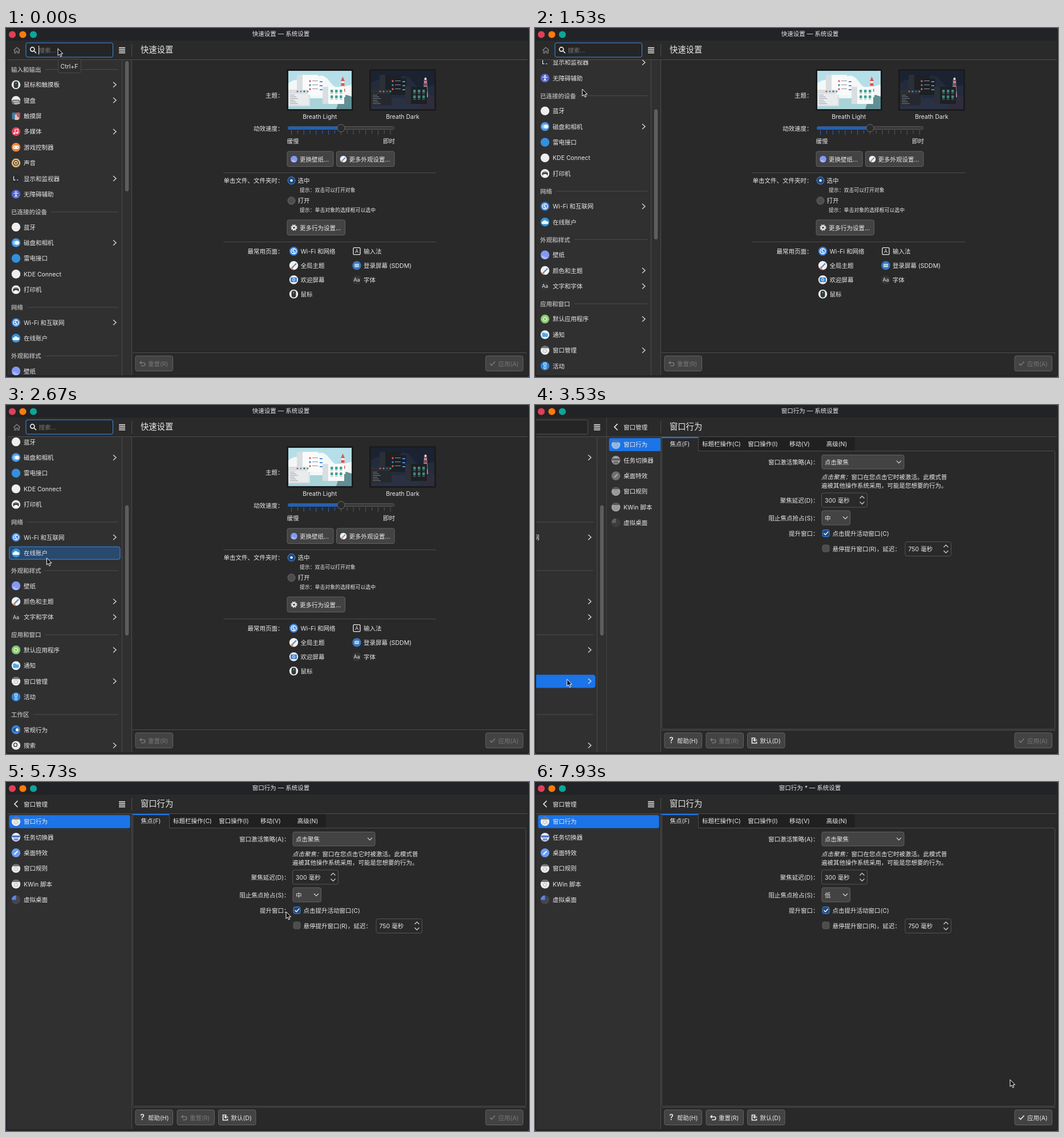
An HTML page for the animation above (8000 ms loop, 917x611 px).

```html
<!DOCTYPE html>
<html lang="zh-CN">
<head>
<meta charset="utf-8">
<title>系统设置</title>
<style>
html, body { margin: 0; width: 100%; height: 100%; overflow: hidden; background: #232427; }
svg { display: block; width: 100%; height: 100%; }
text { font: 10.5px Inter, 'Noto Sans CJK SC', 'Noto Sans CJK', sans-serif; fill: #e9e9e9; white-space: pre; }
.head { font-size: 14.3px; }
.section { font-weight: 700; fill: #a6a6a6; }
.hint { font-size: 8.9px; }
.mid { text-anchor: middle; }
.end { text-anchor: end; }
.off text { fill: #777; }
.line { stroke: #4d4d4e; fill: none; }
.ink { stroke: #ececec; fill: none; stroke-width: 1.7; }
.off .ink { stroke: #777; }
.thin { stroke: #dcdcdc; fill: none; stroke-width: 1.1; }
.arrow { stroke: #d6d6d6; fill: none; stroke-width: 1.4; }
</style>
</head>
<body>
<svg id="stage" viewBox="0 0 917 611" preserveAspectRatio="none"></svg>
<script>
const $ = id => document.getElementById(id);
const rect = (x, y, w, h, fill, more = '') => `<rect x="${x}" y="${y}" width="${w}" height="${h}" fill="${fill}" ${more}/>`;
const disc = (x, y, r, fill, more = '') => `<circle cx="${x}" cy="${y}" r="${r}" fill="${fill}" ${more}/>`;
const path = (d, more = 'class="ink"') => `<path d="${d}" ${more}/>`;
const line = d => path(d, 'class="line"');
const label = (x, mid, s, cls = '', more = '') => `<text x="${x}" y="${mid + 4}" class="${cls}" ${more}>${s}</text>`;
const group = (id, body, more = '') => `<g id="${id}" ${more}>${body}</g>`;
const at = (x, y, body, scale = 1) => `<g transform="translate(${x} ${y}) scale(${scale})">${body}</g>`;
const box = (x, y, w, h, fill = '#434344', stroke = '#626263', more = '') =>
  rect(x + .5, y + .5, w - 1, h - 1, fill, `stroke="${stroke}" rx="3" ${more}`);

// Icons are drawn around their centre, about 16 px wide.
const base = fill => disc(0, 0, 7.7, fill);
const white = (d, w = 1.5) => path(d, `fill="none" stroke="#fff" stroke-width="${w}"`);
const icons = {
  mouse: base('#f1f1f1') + rect(-4, -6, 8, 12, '#35393a', 'rx="4"') + rect(-.6, -4, 1.2, 3, '#5fce9a'),
  keyboard: base('#ececec') + rect(-7, -1, 14, 8, '#77787b', 'rx="2"') + white('M-5 2H5M-3 5H7', 1),
  touch: rect(-7, -6, 14, 12, '#397ea3', 'rx="2"') + rect(1, -6, 6, 7, '#d54e66') + path('M-2 7V-2L1 -3L2 1L6 3L4 7Z', 'fill="#f0bd9c"'),
  music: base('#ed405b') + white('M-1.5 3V-3.5L3.5 -4.5V2', 1.2) + disc(-3, 3, 1.7, '#fff') + disc(2, 2, 1.7, '#fff'),
  game: base('#f2853b') + rect(-5, -3, 10, 6, '#fff', 'rx="2.6"') + disc(-2.5, 0, 1, '#f2853b') + disc(2.5, 0, 1, '#f2853b'),
  sound: base('#e3b673') + disc(0, 0, 5, '#4b4238') + disc(0, 0, 3.4, '#e9c68f') + disc(0, 0, 1.5, '#4b4238'),
  display: base('#2b2c32') + white('M-4 -4V2.5H-1', 1.1) + white('M1.5 2.5H4', 1.1),
  access: base('#5566c9') + disc(0, -4, 1.3, '#fff') + white('M-4 -1.5H4M0 -1.5V1M-2 5L0 1L2 5', 1.2),
  pale: base('#eeeeee'),
  blue: base('#3390df'),
  disk: base('#4a9cec') + rect(-5, -3.5, 10, 7, '#9ccbf6', 'rx="3.5"') + disc(2, 0, 3.5, '#fff'),
  printer: base('#ededed') + rect(-5, -2, 10, 5, '#3c3f40', 'rx="1"') + rect(-3, 1, 6, 4, '#fff') + rect(-3, -4, 6, 2, '#8e9091'),
  net: base('#3d83dc') + disc(0, 0, 4.6, 'none', 'stroke="#fff" stroke-width="1.3"') + white('M1 -4L-2 0L1 1L0 4', 1.4),
  cloud: base('#3396dc') + path('M-4 3.5a2.2 2.2 0 0 1 .5 -4.4a3.2 3.2 0 0 1 6 -.4a2.5 2.5 0 0 1 1.5 4.8Z', 'fill="#fff"'),
  wall: base('#8299f4') + path('M-7 3Q-3 0 0 3T7 3A7.7 7.7 0 0 1 -7 3Z', 'fill="#a5b8ff"'),
  theme: base('#f1f1f1') + path('M-3 4L4.500 -3.500', 'stroke="#5b86c9" stroke-width="2.2"') + path('M-6 4A7.7 7.7 0 0 0 0 7.7L-2.500 3Z', 'fill="#e9855b"'),
  font: base('#343537') + label(0, -.6, 'Aa', 'mid', 'style="font-size:9px"'),
  apps: base('#86c96f') + disc(0, 0, 3.2, 'none', 'stroke="#fff" stroke-width="1.8" stroke-dasharray="1.7 .8"'),
  notice: base('#eaf3fb') + rect(-5, -2, 10, 6, '#4fa8e8', 'rx="1"') + rect(-5, -3.5, 5, 3, '#4fa8e8'),
  window: base('#ededed') + path('M-6.7 -3.8A7.7 7.7 0 0 1 6.7 -3.8Z', 'fill="#6f7072"') +
    disc(0, 1.2, 3, 'none', 'stroke="#b9b9b9" stroke-width="1.4" stroke-dasharray="1.6 .8"'),
  activity: base('#2f87db') + rect(-2, -5, 4, 4, 'none', 'stroke="#fff"') + disc(0, 3, 2, 'none', 'stroke="#fff"'),
  behave: base('#3f84da') + rect(-5, -3, 10, 6, '#214f93', 'rx="3"') + disc(2, 0, 2.6, '#fff'),
  search: base('#ececec') + disc(-1, -1, 3, 'none', 'stroke="#444" stroke-width="1.4"'),
  input: rect(-6, -6, 12, 12, '#222', 'rx="1.5" stroke="#eee" stroke-width="1.3"') + label(0, -.4, 'A', 'mid', 'style="font-size:9px"'),
  login: base('#3977bd') + rect(-4, -3, 8, 6, '#b5d5f2', 'rx="1"') + path('M-3 0H3', 'stroke="#3977bd" stroke-dasharray="1.3 1"'),
  welcome: base('#eeeeee') + rect(-5.5, -4, 11, 8, '#3e84cf', 'rx="1"') + disc(0, 0, 2, 'none', 'stroke="#fff"'),
  tasks: base('#e9eefb') + rect(-7, -3, 14, 3.5, '#4a79d6') + rect(-4, 2, 8, 4, '#7d93c8'),
  effects: base('#6b9df2') + white('M-3 3L3 -3', 2),
  desks: base('#44464d') + path('M0 0V-7.7A7.7 7.7 0 0 0 -7.7 0Z', 'fill="#5a86e8"'),
  gear: disc(0, 0, 4, 'none', 'stroke="#e8e8e8" stroke-width="3.2"') + disc(0, 0, 6.4, 'none', 'stroke="#e8e8e8" stroke-width="2" stroke-dasharray="2.7 2.33"'),
  undo: path('M-1.5 -4L-4 -1.5L-1.5 1M-4 -1.5H2A2.6 2.6 0 0 1 2 4H-2'),
  check: path('M-4.5 0L-1.5 3L4.5 -3.5'),
  reset: path('M2 -4.5H-4V4.5H4V2M5 -1H-1M1.5 -3.5L-1 -1L1.5 1.5'),
  help: label(0, 0, '?', 'mid', 'style="font-size:14px;font-weight:600"'),
};
const icon = (name, x, y, scale) => at(x, y, icons[name], scale);
const chevron = (x, y) => path(`M${x - 2.5} ${y - 4.5}L${x + 2.5} ${y}L${x - 2.5} ${y + 4.5}`, 'class="arrow"');
const menu = path('M198 34.5H209M198 37.5H209M198 40.5H209M198 43.5H209', 'stroke="#efefef" stroke-width="1.4"');
const button = (x, y, w, name, s, { id = '', cls = '', scale = 1 } = {}) => group(id, box(x, y, w, 27.5) +
  icon(name, x + 12.5, y + 14, scale) + label(x + 22.5, y + 14, s), `class="${cls}"`);

// Main list; a trailing > marks entries with a sub page.
const sections = [
  ['输入和输出', 'mouse 鼠标和触摸板>', 'keyboard 键盘>', 'touch 触摸屏', 'music 多媒体>', 'game 游戏控制器', 'sound 声音', 'display 显示和监视器>', 'access 无障碍辅助'],
  ['已连接的设备', 'pale 蓝牙', 'disk 磁盘和相机>', 'blue 雷电接口', 'pale KDE Connect', 'printer 打印机'],
  ['网络', 'net Wi-Fi 和互联网>', 'cloud 在线账户'],
  ['外观和样式', 'wall 壁纸', 'theme 颜色和主题>', 'font 文字和字体>'],
  ['应用和窗口', 'apps 默认应用程序>', 'notice 通知', 'window 窗口管理>', 'activity 活动'],
  ['工作区', 'behave 常规行为', 'search 搜索>'],
];
const PITCH = 27.4;
const rows = [];
let listMarkup = '', y = 72.6, windowRow;
for (const [title, ...items] of sections) {
  listMarkup += label(9, y, title, 'section') + line(`M${16 + title.length * 10.5} ${y}H197`);
  y += 26.6;
  for (const item of items) {
    const [, name, text, more] = item.match(/^(\w+) ([^>]+)(>?)$/);
    listMarkup += icon(name, 17.5, y) + label(31, y, text) + (more ? chevron(190.5, y) : '');
    if (text === '窗口管理') windowRow = y;
    rows.push(y);
    y += PITCH;
  }
  y += 30.9 - PITCH;
}
const subItems = [['window', '窗口行为'], ['tasks', '任务切换器'], ['effects', '桌面特效'], ['window', '窗口规则'], ['window', 'KWin 脚本'], ['desks', '虚拟桌面']];
const subRows = subItems.map((_, i) => 69.2 + i * PITCH);
const rowBox = (id, w) => rect(6, 0, w, 22, '#29496d', `id="${id}" rx="3" stroke="#3b8be6"`);

const mainPage = rect(2, 22, 219, 33, '#2a2a2b') + rect(2, 56, 219, 552, '#303031') +
  path('M13.5 39L19 34L24.5 39M15 38.5V44H17.5V40.5H20.5V44H23V38.5', 'fill="none" stroke="#8c8c8c" stroke-width="1.2"') +
  box(34.5, 25.5, 153.5, 26, '#252526', '#3d8ee6', 'id="field"') + disc(46.3, 37.3, 3.6, 'none', 'stroke="#eee" stroke-width="1.7"') +
  path('M49 40L53 44') + label(57.5, 38.5, '搜索…', '', 'style="fill:#777"') +
  rect(57, 31, 1, 15.5, '#eee', 'id="caret"') + menu +
  `<g clip-path="url(#listClip)">${group('list', rowBox('hover', 194) + listMarkup)}</g>` +
  line('M203.5 56V608') + rect(209.5, 58.5, 5, 227, '#5c5c5d', 'id="thumb" rx="2.5" stroke="#777" stroke-width=".7"') +
  line('M220.5 22V608');
const subPage = rect(2, 22, 219, 33, '#2a2a2b') + rect(2, 56, 219, 552, '#303031') + path('M20.5 33L15 38.5L20.5 44') +
  label(31, 38.5, '窗口管理') + menu + rect(5.5, 58, 212, 22.8, '#1b74e8', 'rx="3"') + rowBox('subHover', 211) +
  group('subIcons', subItems.map(([n], i) => icon(n, 17.5, subRows[i])).join('')) +
  subItems.map(([, s], i) => label(31, subRows[i], s)).join('');

function preview(x, dark) {
  const [sky, cloud, sea, panel, side, red, wall, cliff, folder] = dark
    ? ['#1b2231', '#232c3d', '#2b3145', '#1d2024', '#2b3036', '#874655', '#a497a8', '#2f2d3d', '#3b8a7d']
    : ['#b5dfe8', '#f2f8f8', '#a8d3d9', '#fafafa', '#d9dee1', '#de5358', '#f7f2ef', '#5f8f94', '#3da593'];
  let s = rect(-3, -3, 117, 73, '#1b1b1c', 'rx="2"') + rect(0, 0, 111, 67, sky) +
    path('M0 22Q12 12 24 18T50 10Q62 4 72 18T90 30L111 24V50H0Z', `fill="${cloud}"`) + rect(0, 48, 111, 19, sea) +
    path('M84 67L90 48L102 42L111 45V67Z', `fill="${cliff}"`) +
    path('M91 46L93 18H98L100 46Z', `fill="${wall}"`) + path('M92.5 24H98.5M92 34H99.5', `stroke="${red}" stroke-width="5"`) +
    path('M92 18L95.500 10L99 18Z', `fill="${red}"`) + (dark ? disc(95.5, 14, 2, '#ffe5c9') : '') +
    rect(15, 7, 37, 28, panel) + rect(15, 7, 10, 28, side) + rect(0, 33, 38, 29, side) + rect(2, 40, 34, 20, panel, 'opacity=".45"') +
    rect(34, 13, 28, 29, panel) + rect(60, 28, 38, 30, panel) + rect(60, 28, 10, 30, side);
  for (let i = 0; i < 3; i++) s += disc(38, 18 + 7 * i, 1.7, ['#ed5a52', '#3584dd', '#e85a51'][i]) + rect(42, 17 + 7 * i, 10, 1, '#8b929b') + rect(55, 18 + 7 * i, 5, 2, '#4c8de3');
  for (let i = 0; i < 6; i++) s += rect(74 + i % 3 * 8, 33 + (i / 3 | 0) * 10, 4.5, 5, folder, 'rx="1"') + rect(74 + i % 3 * 8, 39.5 + (i / 3 | 0) * 10, 4.5, .8, '#8b929b');
  for (let i = 0; i < 4; i++) s += disc(16 + i * 6, 36, 1.6, ['#db4b55', '#4b89d8', '#58585c', '#38a489'][i]);
  for (let i = 0; i < 6; i++) s += rect(3, 42 + i * 3, 8 + i % 3 * 3, .8, '#8b929b');
  return at(x, 75, s);
}
const ticks = Array.from({ length: 17 }, (_, i) => {
  const x = 500.5 + i * 10.85;
  return path(`M${x} 179V${i % 2 ? 185 : 187}`, `stroke="${i < 8 ? '#2868b8' : '#5a5a5a'}"`);
}).join('');
const frequent = [['net', 'Wi-Fi 和网络'], ['theme', '全局主题'], ['welcome', '欢迎屏幕'], ['mouse', '鼠标'], ['input', '输入法'], ['login', '登录屏幕 (SDDM)'], ['font', '字体']];
const small = { scale: .76 };
const quickPage = label(236, 39.2, '快速设置', 'head') + label(486.5, 117.5, '主题：', 'end') + preview(495, false) + preview(640, true) +
  label(550.2, 155, 'Breath Light', 'mid') + label(695.5, 155, 'Breath Dark', 'mid') +
  label(486.5, 176, '动效速度：', 'end') + box(494, 172, 187, 6, '#3a3a3b', '#585858') + rect(494, 172.5, 94, 5.5, '#2261b4', 'rx="2.500"') + ticks +
  disc(587.5, 175.3, 6.6, '#2b2b2c', 'stroke="#6b6b6b"') + label(492.5, 197.5, '缓慢') + label(682, 197.5, '即时', 'end') +
  button(492.5, 215.5, 82, 'wall', '更换壁纸…', small) + button(579, 215.5, 102.5, 'theme', '更多外观设置…', small) + line('M381 253.5H754') +
  label(486.5, 266.8, '单击文件、文件夹时：', 'end') + disc(500.5, 267, 6.5, '#20487d', 'stroke="#3d8ee6"') + disc(500.5, 267, 2.2, '#fff') + label(511.5, 266.8, '选中') +
  label(515, 282.7, '提示：双击可以打开对象', 'hint') + disc(500.5, 302.3, 6.5, '#4d4d4e', 'stroke="#6a6a6a"') + label(511.5, 302.3, '打开') +
  label(515, 318.2, '提示：单击对象的选择框可以选中', 'hint') + button(492.5, 335.5, 102.5, 'gear', '更多行为设置…', small) + line('M381 374.5H754') +
  label(486.5, 390.5, '最常用页面：', 'end') +
  frequent.map(([n, s], i) => { const x = i < 4 ? 504.5 : 615, cy = 390.7 + (i < 4 ? i : i - 4) * 25; return icon(n, x, cy) + label(x + 12, cy, s); }).join('') +
  line('M222 568.5H913') + button(226.5, 573.5, 66.5, 'undo', '重置(R)', { cls: 'off' });

const down = (x, cy) => path(`M${x - 4} ${cy - 2}L${x} ${cy + 2}L${x + 4} ${cy - 2}`, 'class="thin"');
const up = (x, cy) => path(`M${x - 4} ${cy + 2}L${x} ${cy - 2}L${x + 4} ${cy + 2}`, 'class="thin"');
const spin = (x, top, w, s) => box(x, top, w, 26, '#2a2a2b', '#555') + label(x + 6, top + 13, s) + up(x + w - 9.5, top + 8) + down(x + w - 9.5, top + 18);
const tabs = [[254, '焦点(F)'], [327, '标题栏操作(C)'], [399.5, '窗口操作(I)'], [464, '移动(V)'], [529, '高级(N)']];
const levels = ['无', '低', '中', '高', '极高'];
const popup = box(502, 209.5, 57, 126, '#2d2d2e', '#505051', 'style="filter:drop-shadow(0 2px 5px #0009)"') +
  rect(504, 0, 53, 24, '#29496d', 'id="choice" rx="3" stroke="#3b8be6"') + levels.map((s, i) => label(505.5, 222 + i * 25, s)).join('');
const behaviorPage = label(236, 39.2, '窗口行为', 'head') + rect(286, 56, 275, 24, '#202021') + rect(222, 56, 64, 2, '#1b74e8') +
  line('M286.5 56V80.5H909Q911.5 80.5 911.5 83V565Q911.5 567.5 909 567.5H225Q222.5 567.5 222.5 565V58') +
  tabs.map(([x, s]) => label(x, 68, s, 'mid')).join('') +
  [[99.5, '窗口激活策略(A)：'], [166.5, '聚焦延迟(D)：'], [197.5, '阻止焦点抢占(S)：'], [224.7, '提升窗口：']].map(([cy, s]) => label(497.5, cy, s, 'end')).join('') +
  box(502.5, 87, 145, 25.5) + label(508, 99.7, '点击聚焦') + down(638, 99.7) +
  label(502, 125.5, '<tspan font-style="italic">点击聚焦：</tspan>窗口在您点击它时被激活。此模式普') + label(502, 141, '遍被其他操作系统采用，可能是您想要的行为。') +
  spin(502, 153.5, 81, '300 毫秒') + box(502.5, 184.5, 50.5, 26, '#434344', '#626263', 'id="combo"') + label(508, 197.5, '中', '', 'id="level"') + down(544, 197.5) +
  box(503.5, 218, 13, 13, '#20487d', '#3d8ee6') + path('M506.5 224.5L509.2 227.3L514 221.8') + label(521.5, 224.7, '点击提升活动窗口(C)') +
  box(503.5, 244.5, 13, 13, '#4d4d4e', '#5c5c5c') + label(521.5, 251.5, '悬停提升窗口(R)，延迟：') + spin(648.5, 239, 81.5, '750 毫秒') +
  line('M222 569.5H913') + button(226.5, 573.5, 66.5, 'help', '帮助(H)') + button(299.5, 573.5, 66.5, 'undo', '重置(R)', { id: 'undo' }) + button(372, 573.5, 66.5, 'reset', '默认(D)') +
  group('popup', popup);

$('stage').innerHTML = `<clipPath id="sideClip">${rect(2, 22, 219, 586, '#000')}</clipPath><clipPath id="listClip">${rect(2, 56, 202, 552, '#000')}</clipPath>` +
  rect(0, 0, 917, 611, '#222326') + path('M914 0H917V3Q916.5 .5 914 0Z', 'fill="#5b2d78"') + path('M0 608Q.5 610.5 3 611H0ZM917 608Q916.5 610.5 914 611H917Z', 'fill="#294a80"') +
  ['#dd4058', '#ff7a0c', '#0ea598'].map((c, i) => disc(11 + i * 18.5, 11.5, 6.1, c)).join('') + label(482, 9.6, '', 'mid', 'id="title"') +
  rect(2, 22, 913, 33, '#2a2a2b') + rect(221, 56, 694, 552, '#29292a') +
  `<g clip-path="url(#sideClip)">${group('main', mainPage)}${group('sub', subPage)}</g>` +
  rect(220, 22, 1, 33, '#2a2a2b') + line('M2 55.5H915M220.5 28V50M220.5 56V608') +
  group('quick', quickPage) + group('behavior', behaviorPage) + button(840.5, 573.5, 66.5, 'check', '应用(A)', { id: 'apply' }) +
  group('tip', box(91, 54, 41, 25, '#2f2f30', '#4b4b4c') + label(111, 66.5, 'Ctrl+F', 'mid')) +
  group('pointer', path('M0 0V12.2L2.8 9.7L4.7 14L6.7 13.1L4.9 9H8.7Z', 'fill="#111" stroke="#fff" stroke-width="1"'));

// Keys are [time, ...values], linear between neighbours.
const pointerKeys = [[0, 91, 36], [290, 91, 36], [510, 83, 107], [2490, 83, 107], [2910, 56, 480], [3545, 56, 480], [3910, 62, 182], [4090, 62, 182], [4590, 62, 72],
  [5150, 62, 72], [5320, 344, 149], [5480, 344, 149], [5720, 491, 227], [5800, 491, 227], [6060, 520, 195], [6690, 520, 195], [7060, 525, 247], [7560, 525, 247], [7920, 833, 521]];
const scrollKeys = [[0, 0], [760, 0], [925, 101.6], [1530, 203.3], [1600, 207], [1650, 207], [1990, 262.2], [2450, 284]];
const clamp = v => Math.max(0, Math.min(1, v));
function track(keys, t) {
  const i = keys.findIndex(k => k[0] > t);
  if (i < 0) return keys.at(-1).slice(1);
  const a = keys[i - 1], b = keys[i], u = (t - a[0]) / (b[0] - a[0]);
  return a.slice(1).map((v, j) => v + (b[j + 1] - v) * u);
}
const set = (id, attrs) => { for (const k in attrs) $(id).setAttribute(k, attrs[k]); };
const show = (id, on) => set(id, { opacity: +on });
const move = (id, x, y) => set(id, { transform: `translate(${x} ${y})` });
function placeHover(id, centre, on) {
  show(id, on && centre !== undefined);
  if (centre !== undefined) set(id, { y: centre - 10.8 });
}

function draw(t) {
  const [px, py] = track(pointerKeys, t), [scroll] = track(scrollKeys, t);
  const opened = t >= 3385, changed = t >= 7590, clicked = t >= 3130;
  move('pointer', px, py);
  show('tip', clamp((430 - t) / 100));
  show('caret', !opened && Math.floor((t + 65) / 499) % 2 === 0);
  set('field', { stroke: opened ? '#555' : '#3d8ee6' });

  const u = clamp((t - 3385) / 314), slide = u < .5 ? 2 * u * u : 1 - 2 * (1 - u) ** 2;
  move('main', -219 * slide, 0);
  move('sub', 219 * (1 - slide), 0);
  move('list', 0, -scroll);
  move('thumb', 0, scroll * .414);
  const under = rows.find(c => Math.abs(c - scroll - py) < 11.6);
  placeHover('hover', clicked ? windowRow : under, clicked || py > 56);
  set('hover', clicked ? { fill: '#1b74e8', stroke: '#1b74e8' } : { fill: '#29496d', stroke: '#3b8be6' });
  const subUnder = subRows.slice(1).find(c => Math.abs(c - py) < 11.6);
  placeHover('subHover', subUnder, u === 1 && px < 217);
  const grey = 1 - clamp((t - 3700) / 200);
  $('subIcons').style.filter = grey ? `grayscale(${grey}) opacity(${1 - .4 * grey})` : 'none';

  show('quick', !opened);
  show('behavior', opened);
  $('title').textContent = (opened ? '窗口行为' : '快速设置') + (changed ? ' *' : '') + ' — 系统设置';
  const popupOpacity = changed ? clamp((7690 - t) / 100) : clamp((t - 6310) / 130);
  show('popup', popupOpacity);
  set('choice', { y: 210 + 25 * (py < 210 ? 2 : Math.min(4, Math.floor((py - 210) / 25))) });
  const overCombo = px > 502 && px < 553 && py > 185 && py < 211;
  set('combo', { stroke: overCombo || popupOpacity > 0 ? '#3d8ee6' : '#626263' });
  $('level').textContent = levels[changed ? 1 : 2];
  for (const id of ['undo', 'apply']) set(id, { class: changed ? '' : 'off' });
}
function frame() {
  draw(performance.now() % 8000);
  requestAnimationFrame(frame);
}
frame();
</script>
</body>
</html>
```
